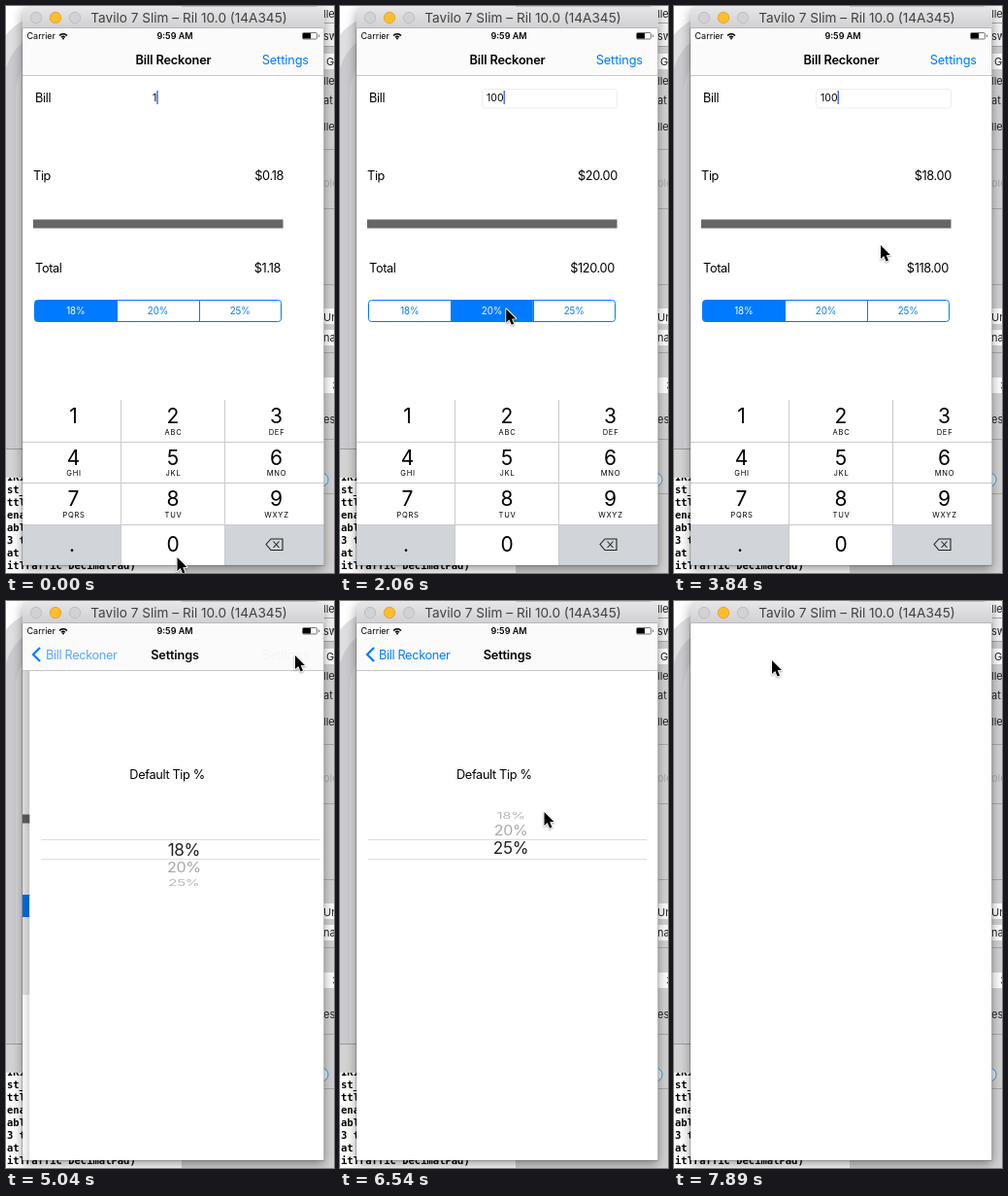
Write an HTML page with a canvas that moves like this. It is 338x583 px and loops after 8000 ms.

```html
<!DOCTYPE html>
<html lang="en">
<head>
<meta charset="utf-8">
<title>Bill Reckoner</title>
<style>
html, body { margin: 0; width: 100%; height: 100%; overflow: hidden; background: #fff; }
canvas { display: block; width: 338px; height: 583px; }
</style>
</head>
<body>
<canvas id="stage"></canvas>
<script>
const W = 338, H = 583, LOOP = 8000;
const BLUE = '#007aff', APP = 'Bill Reckoner';
const RATES = [18, 20, 25];
const SANS = 'Inter, "Open Sans", sans-serif';
const MONO = '"DejaVu Sans Mono", monospace';
const LEFT = 17, TOP = 23, WIDE = 311, BOTTOM = 575, PAD = 405;

const canvas = document.getElementById('stage');
const ctx = canvas.getContext('2d');
const dpr = window.devicePixelRatio || 1;
canvas.width = W * dpr;
canvas.height = H * dpr;

// The screen refreshes in steps of roughly 150 ms
const stepAt = t => t < 3540 ? Math.floor(t / 147.5 + 0.07) : 24 + Math.floor((t - 3540) / 150);

function ease(n, from, to) {
  const k = Math.min(1, Math.max(0, (n - from) / (to - from)));
  return k * k * (3 - 2 * k);
}

function slide(s) {
  return s <= 0 ? 0 : s >= 2 ? 1 : 1 - (1 - s / 2) ** 5.4;
}

// Pointer moves: start step, end step, x, y
const MOVES = [
  [0, 4, 177, 556], [5, 9, 171, 302], [9, 11, 160, 311], [13, 17, 232, 314],
  [19, 20, 135, 309], [20, 22, 83, 317], [24, 26, 213, 246], [26, 29, 298, 56],
  [34, 40, 206, 275], [40, 44, 210.5, 217], [44, 48, 101, 61]
];

function pointerAt(n) {
  return MOVES.reduce(([x, y], [from, to, tx, ty]) => {
    const k = ease(n, from, to);
    return [x + (tx - x) * k, y + (ty - y) * k];
  }, [176.5, 567]);
}

const pushAt = n => slide(n - 33) - slide(n - 49);
const wheelAt = n => 2.1 * ease(n, 40, 44) - 0.1 * ease(n, 44, 45);

function rect(x, y, w, h, color) {
  ctx.fillStyle = color;
  ctx.fillRect(x, y, w, h);
}

function round(x, y, w, h, r, fill, edge) {
  ctx.beginPath();
  ctx.roundRect(x, y, w, h, r);
  if (fill) { ctx.fillStyle = fill; ctx.fill(); }
  if (edge) { ctx.strokeStyle = edge; ctx.stroke(); }
}

function disc(x, y, r, fill, edge) {
  round(x - r, y - r, 2 * r, 2 * r, r, fill, edge);
}

function line(points, color, width = 1) {
  ctx.beginPath();
  points.forEach(p => ctx.lineTo(...p));
  ctx.strokeStyle = color;
  ctx.lineWidth = width;
  ctx.stroke();
  ctx.lineWidth = 1;
}

function text(s, x, y, o = {}) {
  ctx.font = `${o.weight || 400} ${o.size || 12.75}px ${o.font || SANS}`;
  ctx.letterSpacing = (o.gap ?? -0.35) + 'px';
  ctx.textAlign = o.align || 'left';
  ctx.fillStyle = o.color || '#000';
  ctx.globalAlpha = o.alpha ?? 1;
  ctx.fillText(s, x, y);
  ctx.globalAlpha = 1;
}

function fade(x0, y0, x1, y1, from, to) {
  const g = ctx.createLinearGradient(x0, y0, x1, y1);
  g.addColorStop(0, from);
  g.addColorStop(1, to);
  return g;
}

function clipTo(x, y, w, h, paint) {
  ctx.save();
  ctx.beginPath();
  ctx.rect(x, y, w, h);
  ctx.clip();
  paint();
  ctx.restore();
}

function desktop() {
  rect(0, 0, W, H, '#fff');
  ['#dfdfe1', '#cbcbcf', '#d6d6d9'].forEach((c, i) =>
    round(-14 + 12 * i, 8 + 16 * i, 340, 700, 60 - 5 * i, c));

  // Console
  rect(0, 456, 181, 29, '#d3d3d3');
  rect(0, 455, 181, 1, '#9a9a9a');
  clipTo(0, 485, 181, 98, () => {
    rect(0, 485, 181, 98, '#fff');
    ['IKI.', 'st_', 'ttl', 'ena', 'abl', '3 t', 'at ', 'itTraffic DecimalPad)'].forEach((s, i) =>
      text(s, 1, 488 + i * 13, { font: MONO, size: 10.5, weight: 700, gap: 0 }));
  });

  // Inspector
  rect(181, 0, 157, H, '#d2d2d2');
  rect(320, 0, 18, 41, '#f4f4f4');
  [49, 311, 333, 382].forEach(y => rect(320, y, 18, 16, '#fff'));
  [17, 41, 147, 208, 286, 356, 445, 501].forEach(y => rect(320, y, 18, 1, '#a9a9a9'));
  const tags = { lle: [12, 81, 128], sw: [35], ' G': [61], at: [101], ole: [186], Un: [324], na: [345], '   3': [394], es: [429] };
  for (const [s, rows] of Object.entries(tags))
    rows.forEach(y => text(s, 327, y, { size: 11, color: s === 'ole' ? '#aaa' : '#222', gap: 0 }));
  disc(325, 487, 7, '#e8eef4', '#4a90d9');
}

function frame() {
  ctx.save();
  ctx.shadowColor = 'rgba(0,0,0,.4)';
  ctx.shadowBlur = 12 * dpr;
  ctx.shadowOffsetY = 4 * dpr;
  round(LEFT, 1, WIDE - 0.5, 574, [4, 4, 0, 0], '#fff');
  ctx.restore();
  round(LEFT, 1, WIDE - 0.5, 22, [4, 4, 0, 0], fade(0, 1, 0, 23, '#e6e5e7', '#d0cfd1'));
  rect(LEFT, 22, WIDE - 0.5, 1, '#b9b8ba');
  for (let i = 0; i < 3; i++)
    disc(31 + 20 * i, 12, 5.7, i === 1 ? '#fdbd2e' : '#d2d1d3', i === 1 ? '#e3a832' : '#bfbec0');
  text('Tavilo 7 Slim – Ril 10.0 (14A345)', 188.5, 17, { size: 13.6, color: '#404040', align: 'center', gap: 0 });
}

function statusBar() {
  text('Carrier', 21.5, 34, { size: 9, gap: 0 });
  text('9:59 AM', 174, 34, { size: 9, weight: 600, align: 'center', gap: 0 });
  ctx.strokeStyle = '#000';
  ctx.lineWidth = 1.5;
  [2.6, 5.2].forEach(r => {
    ctx.beginPath();
    ctx.arc(59, 34, r, -Math.PI * 0.77, -Math.PI * 0.23);
    ctx.stroke();
  });
  ctx.lineWidth = 1;
  disc(59, 33.4, 1, '#000');
  round(305.5, 27.5, 15, 6.5, 1.2, null, '#777');
  rect(306, 28, 8, 5.5, '#000');
  rect(322, 29.5, 1, 2.5, '#777');
}

function navBar(p, tapped) {
  const q = 1 - p;
  const bold = { weight: 600, align: 'center', gap: -0.15 };
  rect(LEFT, TOP, WIDE, 48, '#fbfbfb');
  rect(LEFT, 71, WIDE, 1, '#c9c9cb');
  statusBar();
  text('Settings', 312, 59.5, { color: BLUE, align: 'right', gap: -0.1, alpha: tapped ? 0.25 : Math.min(1, q * 2) });
  text(APP, 172.5 - p * 90, 59.5, { ...bold, alpha: q * q });
  text('Settings', 172.5 + q * 65, 59.5, { ...bold, alpha: p });
  const back = tapped ? 0.3 : p;
  text(APP, 40 + q * 44, 59.5, { color: BLUE, alpha: back ** 18 });
  ctx.globalAlpha = back;
  line([[35, 48], [28, 55], [35, 62]], BLUE, 2.2);
  ctx.globalAlpha = 1;
}

function keypad(pressed) {
  const grey = '#d1d4d9', rule = '#c9cbcf', rowH = 42.6;
  const mids = [69.5, 172, 278.5];
  const digit = (s, x, y) => text(s, x, y, { size: 21, align: 'center', gap: 0 });
  rect(LEFT, PAD, WIDE, BOTTOM - PAD, '#fff');
  rect(LEFT, 533, WIDE, 42, grey);
  if (!pressed) rect(118, 533, 107, 42, '#fff');
  [118, 225].forEach(x => rect(x, PAD, 1, 170, rule));
  [1, 2, 3].forEach(i => rect(LEFT, Math.round(PAD + i * rowH), WIDE, 1, rule));
  ['', 'ABC', 'DEF', 'GHI', 'JKL', 'MNO', 'PQRS', 'TUV', 'WXYZ'].forEach((s, i) => {
    const x = mids[i % 3], y = PAD + rowH * Math.floor(i / 3);
    digit(i + 1, x, y + 24);
    text(s, x + 0.5, y + 35.5, { size: 7.6, align: 'center', gap: 0.7 });
  });
  digit('.', 68, 561);
  digit('0', 172, 561);
  line([[268, 553.5], [273, 548], [285, 548], [285, 559.5], [273, 559.5], [268, 553.5], [273, 548]], '#222', 1.1);
  line([[275.5, 550.5], [281.5, 557]], '#222', 1.1);
  line([[281.5, 550.5], [275.5, 557]], '#222', 1.1);
}

function segments(active) {
  const x = 29.5, y = 302.5, w = 254, h = 22, part = w / 3;
  ctx.save();
  round(x, y, w, h, 3, '#fff');
  ctx.clip();
  rect(x + active * part, y, part, h, BLUE);
  [1, 2].forEach(i => rect(Math.round(x + i * part), y, 1, h, BLUE));
  ctx.restore();
  round(x, y, w, h, 3, null, BLUE);
  RATES.forEach((r, i) => text(r + '%', x + part * (i + 0.5), 317.3,
    { size: 9.75, gap: -0.1, align: 'center', color: i === active ? '#fff' : BLUE }));
}

function calculator(n, t, p) {
  const bill = n < 2 ? 1 : n < 4 ? 10 : 100;
  const active = n < 12 ? 0 : n < 17 ? 1 : n < 24 ? 2 : n < 50 ? 0 : 2;
  const tip = bill * RATES[active] / 100;
  const caretOn = t < 580 || (t - 580) % 1000 < 500;
  const right = { align: 'right' };
  ctx.save();
  ctx.translate(-93 * p, 0);
  rect(LEFT, 71, WIDE, 504, '#fff');
  text('Bill', 30, 99);
  if (n > 0) round(146.5, 85.5, 139, 19.5, 3, null, '#ededed');
  text(bill, 151, 98, { size: 10.5, gap: 0 });
  if (caretOn) rect(151 + ctx.measureText(bill).width, 87, 1.4, 14, '#4464e8');
  text('Tip', 28, 179);
  text('$' + tip.toFixed(2), 286, 179, right);
  rect(28, 219.5, 257.5, 9, '#666');
  text('Total', 30, 274);
  text('$' + (bill + tip).toFixed(2), 283, 274, right);
  segments(active);
  rect(LEFT, 71, WIDE, PAD - 71, `rgba(0,0,0,${0.12 * p})`);
  ctx.translate(-247 * p, 0);
  keypad(n === 1 || n === 3);
  ctx.restore();
}

function wheel(pos) {
  RATES.forEach((r, i) => {
    const d = i - pos, a = d * 0.335, far = Math.abs(d);
    const shade = far < 0.5 ? 34 : 150 + far * 16;
    ctx.save();
    ctx.translate(176, 255.4 + 54 * Math.sin(a));
    ctx.scale(1, Math.cos(a) ** 2);
    text(r + '%', 0, 6.2, { size: 17.2 * (1 - 0.06 * far), align: 'center', color: `rgb(${shade},${shade},${shade})` });
    ctx.restore();
  });
}

function settings(p, pos) {
  ctx.save();
  ctx.translate((1 - p) * WIDE, 0);
  rect(LEFT - 8, 71, 8, 504, fade(9, 0, LEFT, 0, 'rgba(0,0,0,0)', 'rgba(0,0,0,.14)'));
  rect(LEFT, 71, WIDE, 504, '#fff');
  text('Default Tip %', 120, 183);
  [245, 265].forEach(y => rect(29, y, 287, 1, '#dedede'));
  wheel(pos);
  ctx.restore();
}

function pointer(x, y) {
  ctx.save();
  ctx.translate(x, y);
  ctx.beginPath();
  [[0, 0], [0, 14], [3.2, 11], [5.6, 16.4], [8, 15.4], [5.7, 10.2], [10, 10]].forEach(p => ctx.lineTo(...p));
  ctx.closePath();
  ctx.lineJoin = 'round';
  ctx.strokeStyle = '#fff';
  ctx.lineWidth = 1.8;
  ctx.shadowColor = 'rgba(0,0,0,.35)';
  ctx.shadowBlur = 2 * dpr;
  ctx.shadowOffsetY = dpr;
  ctx.stroke();
  ctx.shadowColor = 'transparent';
  ctx.fillStyle = '#000';
  ctx.fill();
  ctx.restore();
}

function draw(now) {
  const t = now % LOOP, n = stepAt(t), p = pushAt(n);
  ctx.setTransform(dpr, 0, 0, dpr, 0, 0);
  desktop();
  frame();
  if (n < 53) clipTo(LEFT, TOP, WIDE - 0.5, BOTTOM - TOP, () => {
    if (p < 1) calculator(n, t, p);
    if (p > 0) settings(p, wheelAt(n));
    navBar(p, (n > 30 && n < 34) || n === 49);
  });
  line([[16.7, TOP], [16.7, 575.3], [327.7, 575.3], [327.7, TOP]], 'rgba(0,0,0,.28)', 0.8);
  pointer(...pointerAt(n));
  requestAnimationFrame(draw);
}
requestAnimationFrame(draw);
</script>
</body>
</html>
```
